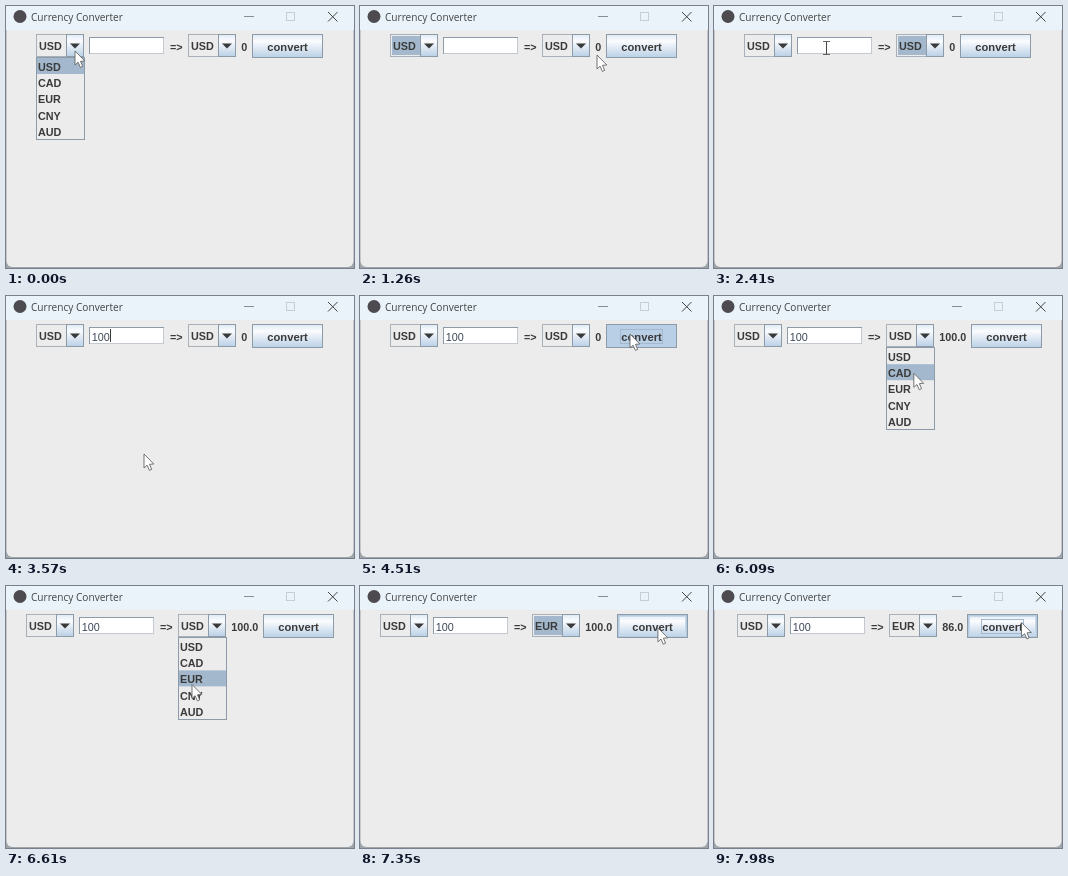
Recreate the animation shown at these times as an HTML page with a canvas. Size 348 by 262 pixels, loop 8000 ms.

```html
<!DOCTYPE html>
<html lang="en">
<head>
<meta charset="utf-8">
<title>Currency Converter</title>
<style>
html, body { margin: 0; width: 100%; height: 100%; overflow: hidden; background: #ececec; }
canvas { display: block; }
</style>
</head>
<body>
<canvas id="stage" width="348" height="262"></canvas>
<script>
const g = document.getElementById('stage').getContext('2d');
const LOOP = 8000, STEP = 105;
const CURRENCIES = ['USD', 'CAD', 'EUR', 'CNY', 'AUD'];
const BORDER = '#8d9aa8', SOFT = '#a9b0b8', FOCUS = '#a3b8cc', PRESSED = '#b8cfe5', PANEL = '#ececec', INK = '#3a3a3a';
const BOLD = 'bold 10.8px "Liberation Sans", sans-serif';
const BUTTON = 'bold 11.2px "Liberation Sans", sans-serif';
const PLAIN = '10.8px "Liberation Sans", sans-serif';

// Pointer stops: time, x, y
const pointer = [
  [0, 69, 45], [780, 69, 45], [1155, 236, 49], [1260, 237, 49], [1470, 222, 43],
  [2050, 222, 43], [2400, 112, 42], [2620, 112, 42], [3000, 138, 158], [4150, 138, 158],
  [4460, 270, 38], [4830, 270, 38], [5300, 215, 43.5], [5800, 215, 43.5],
  [6350, 187, 106], [6560, 186, 98.5], [6870, 186, 98.5], [7450, 307.5, 37], [7980, 307.5, 36.5]
];

const between = (t, a, b) => t >= a && t < b;

function pointerAt(t) {
  const i = pointer.findIndex(p => p[0] > t);
  if (i < 0) return pointer.at(-1).slice(1);
  const [t0, x0, y0] = pointer[i - 1], [t1, x1, y1] = pointer[i];
  const u = (t - t0) / (t1 - t0), e = u * u * (3 - 2 * u);
  return [x0 + (x1 - x0) * e, y0 + (y1 - y0) * e];
}

function box(x, y, w, h, fill, stroke) {
  if (fill) { g.fillStyle = fill; g.fillRect(x, y, w, h); }
  if (stroke) {
    g.strokeStyle = stroke;
    g.lineWidth = 1;
    g.strokeRect(x + .5, y + .5, w - 1, h - 1);
  }
}

function text(s, x, y, font = BOLD, color = INK) {
  g.font = font;
  g.fillStyle = color;
  g.fillText(s, x, y);
}

function path(points, close) {
  g.beginPath();
  points.forEach(([x, y]) => g.lineTo(x, y));
  if (close) g.closePath();
}

function steel(y, h) {
  const fill = g.createLinearGradient(0, y, 0, y + h);
  [[0, '#dde8f3'], [.3, '#fafcfe'], [.6, '#dde8f3'], [1, '#b8cfe5']].forEach(s => fill.addColorStop(...s));
  return fill;
}

function drawWindow() {
  g.fillStyle = '#a0a5aa';
  g.fillRect(0, 0, 348, 262);
  g.fillStyle = PANEL;
  g.beginPath();
  g.roundRect(.5, -10, 347, 271, 6);
  g.fill();
  box(0, 0, 348, 24, '#e9f3f9');
  g.fillStyle = '#4d4a50';
  g.beginPath();
  g.arc(14, 10.5, 6.5, 0, 7);
  g.fill();
  text('Currency Converter', 25, 14.5, '10.1px "Open Sans", sans-serif', '#444');
  box(238, 10, 10, 1, '#8a8d90');
  box(280, 6, 9, 9, null, '#c8cdd1');
  g.strokeStyle = '#444';
  path([[322, 6], [331.5, 15.5]]);
  g.stroke();
  path([[331.5, 6], [322, 15.5]]);
  g.stroke();
}

function drawCombo(x, value, focused) {
  box(x, 28, 48, 23, PANEL, SOFT);
  if (focused) box(x + 2, 30, 28, 19, FOCUS);
  box(x + 30, 28, 18, 23, steel(28, 23), BORDER);
  g.fillStyle = INK;
  path([[x + 34, 37.5], [x + 44, 37.5], [x + 39, 42.5]], true);
  g.fill();
  text(value, x + 3, 44);
}

function drawField(x, value, caret) {
  box(x, 31, 75, 17, '#fff', '#c3c9cf');
  box(x, 31, 75, 1, BORDER);
  box(x, 31, 1, 17, BORDER);
  text(value, x + 2.7, 45, PLAIN, '#3c4658');
  if (caret) box(Math.round(x + 3 + g.measureText(value).width), 33, 1, 13, INK);
}

function drawPopup(x, px, py) {
  box(x, 51, 49, 83, PANEL, BORDER);
  const inside = px >= x && px < x + 49 && py >= 52 && py < 133;
  const row = inside ? Math.floor((py - 52) / 16.2) : 0;
  box(x + 1, 52 + row * 16.2, 47, 16, FOCUS);
  CURRENCIES.forEach((name, i) => text(name, x + 2, 65 + i * 16.2));
}

function drawButton(x, pressed, focused, hover) {
  box(x, 28, 71, 24, pressed ? PRESSED : steel(28, 24), BORDER);
  if (hover && !pressed) {
    box(x + 1, 29, 69, 22, null, '#b4cae1');
    box(x + 2, 30, 67, 20, null, '#c8d9ea');
  }
  if (focused) box(x + 14, 33, 43, 15, null, FOCUS);
  g.textAlign = 'center';
  text('convert', x + 35.5, 45, BUTTON);
  g.textAlign = 'left';
}

function drawPointer(x, y, beam) {
  if (beam) {
    x = Math.round(x);
    box(x, 36, 1, 13, '#444');
    box(x - 3, 35, 7, 1, '#666');
    box(x - 3, 48, 7, 1, '#666');
    return;
  }
  path([[0, 0], [0, 14], [3.1, 11.2], [5.4, 16.4], [7.7, 15.4], [5.5, 10.3], [9.8, 10]]
    .map(([a, b]) => [x + a, y + b]), true);
  g.fillStyle = '#fff';
  g.fill();
  g.strokeStyle = '#666';
  g.lineWidth = .9;
  g.stroke();
}

function draw(t) {
  const [px, py] = pointerAt(t);
  // The row stays centred as the result label changes width
  const [result, left, right] = t < 4620 ? ['0', 0, 0] : t < 7740 ? ['100.0', -10, 11] : ['86.0', -7, 7];
  const from = 30 + left, field = 83 + left, to = 182 + left, button = 246 + right;
  const typing = between(t, 2520, 4450);
  const typed = '100'.slice(0, [3040, 3250, 3460].filter(k => t >= k).length);

  drawWindow();
  drawCombo(from, 'USD', between(t, 730, 1560));
  drawField(field, typed, typing && (t - 2520) % 1000 < 500);
  text('=>', field + 81, 45);
  drawCombo(to, t < 6820 ? 'USD' : 'EUR', between(t, 1990, 2520) || between(t, 6820, 7560));
  text(result, to + 53.3, 45);

  const hover = px >= button && px < button + 71 && py >= 28 && py < 52;
  const pressed = between(t, 4450, 4620) || between(t, 7560, 7740);
  drawButton(button, pressed, between(t, 4450, 5560) || t >= 7560, hover);

  if (t < 730) drawPopup(from, px, py);
  if (between(t, 1560, 1990) || between(t, 5560, 6820)) drawPopup(to, px, py);

  const overField = px >= field && px < field + 75 && py >= 31 && py < 48;
  drawPointer(px, py, overField);
}

const start = performance.now();
function tick() {
  const t = (performance.now() - start) % LOOP;
  draw(Math.floor((t + 5) / STEP) * STEP);
  requestAnimationFrame(tick);
}
tick();
</script>
</body>
</html>
```
